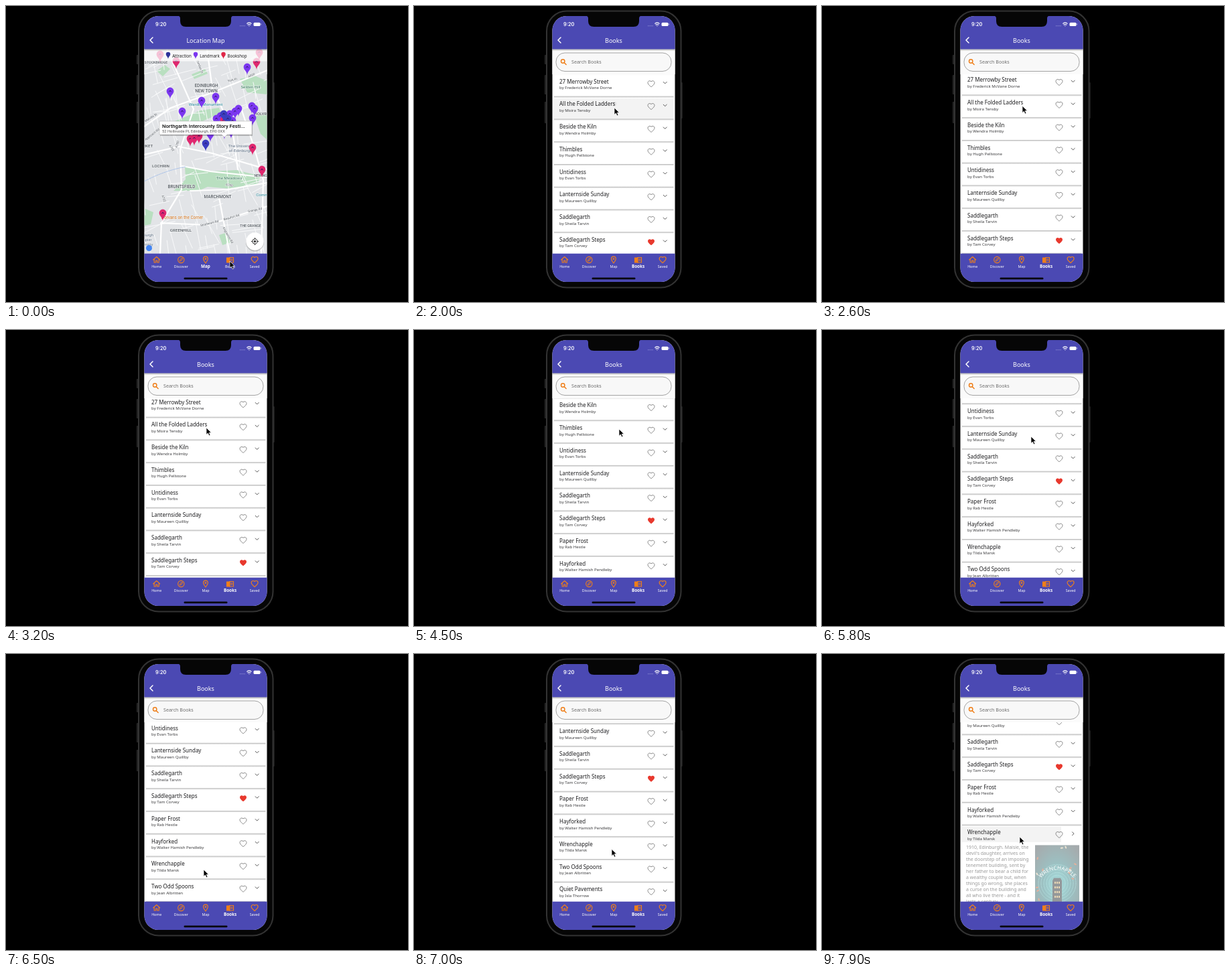
Animation of 600x442 px, one loop 8 s. Source, as an HTML page:

```html
<!DOCTYPE html>
<html lang="en">
<head>
<meta charset="utf-8">
<title>Book app</title>
<style>
  html, body { margin: 0; width: 100%; height: 100%; overflow: hidden; background: #000; }
  svg { display: block; width: 600px; height: 442px; }
  text { font-family: "Noto Sans", sans-serif; }
  .map text, .popup text { font-family: Roboto, sans-serif; }
  .map text { fill: #555b62; text-anchor: middle; paint-order: stroke; stroke: #f2f3f4; stroke-width: 1px; }
  .mid { text-anchor: middle; }
  .title { font-size: 8px; font-weight: 500; fill: #1d1d1f; }
  .by { font-size: 6.1px; fill: #3a3a3c; }
  .line { fill: none; stroke-linecap: round; stroke-linejoin: round; }
</style>
</head>
<body>
<svg id="stage" viewBox="0 0 600 442" xmlns="http://www.w3.org/2000/svg">
  <defs>
    <clipPath id="screen"><rect x="206.5" y="15" width="183" height="397" rx="21"/></clipPath>
    <clipPath id="listArea"><rect x="206.5" y="101" width="183" height="269"/></clipPath>
    <clipPath id="mapArea"><rect x="206.5" y="64" width="183" height="306"/></clipPath>
    <linearGradient id="shade" x2="0" y2="1">
      <stop offset="0" stop-color="#000" stop-opacity=".28"/>
      <stop offset="1" stop-color="#000" stop-opacity="0"/>
    </linearGradient>
    <radialGradient id="cover" cx=".5" cy=".6" r=".7">
      <stop offset="0" stop-color="#55c5c5"/>
      <stop offset=".45" stop-color="#3b8588"/>
      <stop offset="1" stop-color="#4e5a5e"/>
    </radialGradient>
    <path id="heart" transform="scale(.5) translate(-12 -12)" d="M12 21.3l-1.5-1.3C5.4 15.4 2 12.3 2 8.5 2 5.4 4.4 3 7.5 3c1.7 0 3.4.8 4.5 2.1C13.1 3.8 14.8 3 16.5 3 19.6 3 22 5.4 22 8.5c0 3.8-3.4 6.9-8.6 11.5z"/>
    <path id="pin" d="M0 12C-.6 6-5.4 4.6-5.4 0a5.4 5.4 0 0 1 10.8 0C5.4 4.6.6 6 0 12z"/>
  </defs>

  <g fill="#242424">
    <rect x="194.8" y="73" width="4" height="14" rx="1"/>
    <rect x="194.8" y="103" width="4" height="29" rx="1"/>
    <rect x="194.8" y="143" width="4" height="32" rx="1"/>
    <rect x="397.5" y="114" width="3.2" height="54" rx="1"/>
  </g>
  <rect x="198" y="7.5" width="200.5" height="413" rx="30" fill="#060606" stroke="#333" stroke-width="2"/>

  <g clip-path="url(#screen)">
    <rect x="206" y="15" width="184" height="397" fill="#fbfbfb"/>
    <g id="list" clip-path="url(#listArea)"><g id="rows"></g></g>
    <rect x="206" y="64" width="184" height="38" fill="#fbfbfb"/>
    <rect x="212" y="70" width="172" height="27.5" rx="13" fill="#f8f8f8" stroke="#8f8f8f" stroke-width=".8"/>
    <g class="line" stroke="#ef7f1a" stroke-width="1.5">
      <circle cx="222.2" cy="82.5" r="2.7"/><path d="M224.3 84.7l2.8 2.8"/>
    </g>
    <text x="235" y="86" font-size="7.1" fill="#6d6d6d">Search Books</text>
    <g id="map" class="map" clip-path="url(#mapArea)"></g>
    <rect x="206" y="15" width="184" height="49.5" fill="#4b49b3"/>
    <rect x="206" y="64.5" width="184" height="3" fill="url(#shade)"/>
    <path class="line" d="M219 47l-4 4 4 4" stroke="#fff" stroke-width="1.5"/>
    <text id="mapTitle" class="mid" x="298" y="54.5" font-size="9" font-weight="500" fill="#fff">Location Map</text>
    <text id="bookTitle" class="mid" x="298" y="54.5" font-size="9" font-weight="500" fill="#fff">Books</text>
    <text x="223" y="30" style="font-family:Inter,sans-serif" font-size="7.3" font-weight="600" fill="#fff">9:20</text>
    <path d="M349 29.7h8" stroke="#8583d0" stroke-width="1.2" stroke-dasharray="1.2 1"/>
    <g class="line" stroke="#fff" stroke-width="1.2">
      <path d="M359.7 26.2q3.2-2.6 6.4 0M361.1 28q1.8-1.5 3.6 0"/><path d="M362.9 29.6v.1"/>
    </g>
    <rect x="369.5" y="24.7" width="10" height="5.3" rx="1.5" fill="#fff"/>
    <path d="M380.7 26.3v2" stroke="#b9b8e4" stroke-width=".9"/>
    <rect x="206" y="369.7" width="184" height="43" fill="#4b49b3"/>
    <g id="nav"></g>
    <rect x="265.5" y="405.6" width="65" height="2.6" rx="1.3" fill="#08080c"/>
  </g>
  <path d="M256 14.5h84q-4 .3-4 4v4q0 8.500-8.500 8.500h-59q-8.500 0-8.500-8.500v-4q0-3.700-4-4z" fill="#060606"/>
  <path id="cursor" d="M0 0v10.200l2.400-2.200 1.700 3.800 1.800-.8-1.700-3.700h3.200z" fill="#000" stroke="#fff" stroke-width=".7"/>
</svg>

<script>
const $ = id => document.getElementById(id);
const LOOP = 8000, STEP = 100, PITCH = 33.77, OPEN_ROW = 10, LIKED_ROW = 7;

const books = [
  ["27 Merrowby Street", "Frederick McVane Dorne"],
  ["All the Folded Ladders", "Moira Tensby"],
  ["Beside the Kiln", "Wendra Holmby"],
  ["Thimbles", "Hugh Pellstone"],
  ["Untidiness", "Evan Torbs"],
  ["Lanternside Sunday", "Maureen Quillby"],
  ["Saddlegarth", "Sheila Tarvin"],
  ["Saddlegarth Steps", "Tam Corvey"],
  ["Paper Frost", "Rab Hestle"],
  ["Hayforked", "Walter Hamish Pendleby"],
  ["Wrenchapple", "Tilda Marsk"],
  ["Two Odd Spoons", "Jean Albritten"],
  ["Quiet Pavements", "Isla Thorrow"],
  ["Slate and Tallow", "Murdo Fennick"]
];

const blurb = ["1910, Edinburgh. Maisie, the", "devil's daughter, arrives on",
  "the doorstep of an imposing", "tenement building, sent by", "her father to bear a child for",
  "a wealthy couple but, when", "things go wrong, she places", "a curse on the building and",
  "all who live there - and it", "lasts a century."];

const label = (x, y, s, size = 6, extra = "") =>
  `<text x="${x}" y="${y}" font-size="${size}" ${extra}>${s}</text>`;
const use = (id, x, y, extra = "") => `<use href="#${id}" transform="translate(${x} ${y})" ${extra}/>`;

function seeded(seed) {
  return () => (seed = (seed * 16807) % 2147483647) / 2147483647;
}

function buildRows() {
  $("rows").innerHTML = books.map(([title, author], i) => {
    const y = 112.7 + i * PITCH, liked = i === LIKED_ROW;
    return `<g class="row">
      <rect x="209" y="${y - 9.5}" width="178.500" height="31.500" fill="#fff"/>
      <rect x="209" y="${y + 22}" width="178.500" height="2.600" fill="url(#shade)"/>
      <g class="press"></g>
      ${label(217, y + 2.9, title, 8, 'class="title"')}
      ${label(217, y + 11.4, "by " + author, 6.1, 'class="by"')}
      ${use("heart", 354, y + 3.6, liked ? 'fill="#e8382d"' : 'fill="none" stroke="#777" stroke-width="1.7"')}
      <path class="line chevron" d="M-2.500-1.200L0 1.300 2.500-1.200" stroke="#555" stroke-width="1"
        transform="translate(374.700 ${y + 1.9})"/></g>`;
  }).join("");
}

function buildPanel() {
  const y = 112.7 + OPEN_ROW * PITCH + 18, rnd = seeded(11);
  let leaves = "";
  for (let i = 0; i < 26; i++) {
    const x = 321 + rnd() * 60, dy = rnd() * 92;
    if (Math.abs(x - 351) > 18 || dy < 14)
      leaves += `<ellipse cx="${x}" cy="${y + dy + 3}" rx="2.200" ry="1.100" fill="${i % 3 ? "#c9653f" : "#d9c9a8"}"
        transform="rotate(${rnd() * 180} ${x} ${y + dy + 3})"/>`;
  }
  let rings = "";
  for (let r = 12; r < 32; r += 4)
    rings += `<circle cx="351" cy="${y + 58}" r="${r}" class="line" stroke="#7fd6d3" stroke-width=".7" stroke-dasharray="1 1.500"/>`;
  const g = document.createElementNS("http://www.w3.org/2000/svg", "g");
  g.id = "panel";
  g.innerHTML = `<rect x="209" y="${y - 2}" width="178.500" height="110" fill="#fff"/>
    <g id="details">${blurb.map((s, i) => label(215, y + 7 + i * 9, s, 7, 'fill="#333"')).join("")}
    <g opacity="1.000"><rect x="318" y="${y + 1}" width="66" height="100" fill="url(#cover)"/>
    ${rings}${leaves}
    <path id="arc" class="line" d="M324 ${y + 53}Q351 ${y + 22} 379 ${y + 53}"/>
    <text font-size="8" fill="#fff" class="mid"><textPath href="#arc" startOffset="50%">WRENCHAPPLE</textPath></text>
    <path d="M344 ${y + 92}v-38l2-4h10l2 4v38z" fill="#2c3438"/>
    <path d="M347 ${y + 57}h8M347 ${y + 64}h8M347 ${y + 71}h8M347 ${y + 78}h8" stroke="#d2b06c" stroke-width="3" stroke-dasharray="2 1"/></g></g>`;
  $("rows").append(g);
}

function buildMap() {
  const rnd = seeded(7);
  let streets = "";
  for (let i = 0; i < 150; i++) {
    const a = (rnd() < .5 ? -.3 : 1.25) + (rnd() - .5) * .5, len = 15 + rnd() * 35;
    const x = 200 + rnd() * 190, y = 66 + rnd() * 300;
    streets += `M${x} ${y}l${Math.cos(a) * len} ${Math.sin(a) * len}`;
  }
  const places = [
    [224, 86, "STOCKBRIDGE", 5.2], [299, 121, "EDINBURGH", 6.4], [299, 129, "NEW TOWN", 6.4],
    [386, 163, "HOLYROOD", 6.2], [207, 211, "MARKET", 6.2], [231, 241, "LOCHRIN", 6.2],
    [262, 271.500, "BRUNTSFIELD", 6.4], [316, 287, "MARCHMONT", 6.4], [261, 337, "GREENHILL", 6.2],
    [365, 330, "THE GRANGE", 5.2], [385, 255, "NEWINGTON", 5]
  ];
  const sights = [
    [298, 149, "Wardle Monument", 6.2, "#23889b"], [365, 123, "Selden Hill", 6.2, "#317a55"],
    [333, 259, "The Meadows", 6.2, "#317a55"], [351, 211, "The University", 6.2, "#5f7085"],
    [350, 218, "of Edinburgh", 6.2, "#5f7085"], [263, 318, "Dorvans on the Corner", 6.3, "#d4761f"],
    [386, 284, "Common", 6.2, "#23889b"], [211, 344, "nburgh", 5.8, "#5f7085"],
    [211, 351, "apier", 5.8, "#5f7085"], [211, 358, "versity", 5.8, "#5f7085"]
  ];
  const roads = [
    [288, 91, "Dundas St", 70], [367, 105, "A900", -25], [338, 112, "York Pl", -12], [217, 168, "Melville St", -32],
    [219, 193, "Approach Rd", -38], [257, 207, "A700", -75], [246, 213, "A702", 55],
    [333, 269, "A700", 10], [304, 326, "Strathearn Rd", -14], [337, 317, "Beaufort Rd", -16],
    [372, 306, "Grange Rd", -12], [330, 343, "Kilgraston Rd", 60], [234, 288, "A702", 70]
  ];
  const pins = {
    "#7b37f0": [[360, 91], [245, 127], [292, 141], [313, 135], [263, 157], [314, 168], [320, 164], [334, 161],
      [342, 157], [347, 153], [367, 149], [371, 153], [368, 167], [338, 171], [305, 191], [336, 186], [326, 187]],
    "#e0286f": [[254, 82], [374, 83], [275, 198], [281, 197], [288, 194], [368, 211], [382, 244], [234, 309], [325, 170]],
    "#3b3ec0": [[325, 161], [331, 168], [298, 205]]
  };
  const marker = (x, y, fill) => use("pin", x, y, `fill="${fill}"`) +
    `<path class="line" d="M${x - 1.5} ${y + 1}l1.500-2 1.500 2" stroke="#2a1760" stroke-width=".9"/>`;
  const small = (x, fill) => `<use href="#pin" transform="translate(${x} 72) scale(.6)" fill="${fill}"/>`;

  $("map").innerHTML = `<rect x="206" y="64" width="184" height="306" fill="#e2e4e7"/>
    <g fill="#b9dfc0">
      <path d="M267 239l35 8 42-2 36 9-4 11-40 8-35-3-14 6h-37l18-17z"/>
      <path d="M349 109l22-5 19 8v20l-30-3z"/><path d="M252 172l38-16 28-4 3 8-44 19z"/>
      <path d="M371 165l19-5v40l-10-9z"/><path d="M225 97l12-9 8 6-11 11z"/>
      <path d="M206 302l14 6-4 18-10 2zM318 342l12-4 6 15-13 4z"/><path d="M277 102l20-8 4 7-20 8z"/>
    </g>
    <path class="line" d="${streets}" stroke="#f8f9fa" stroke-width="1"/>
    <path class="line" stroke="#fff" stroke-width="2.200" d="M206 180l40-28 60-22 84-34M240 64l40 90-20 60 2 60-30 50-2 46M206 222l52-12 50 10 82 24M263 239l42 8 85 9M350 150l20 60 14 50-3 110M231 324l70 3 89-28M300 64l8 60 30 60 8 60M275 276l55-2 60-10M318 286l16 84"/>
    <path class="line" d="M206 262q30-16 62-22" stroke="#9ab8e8" stroke-width=".8" stroke-dasharray="2 1"/>
    ${places.map(([x, y, s, z]) => label(x, y, s, z, 'font-weight="500"')).join("")}
    ${sights.map(([x, y, s, z, c]) => label(x, y, s, z, `style="fill:${c}"`)).join("")}
    ${roads.map(([x, y, s, r]) => label(x, y, s, 4.6, `transform="rotate(${r} ${x} ${y})"`)).join("")}
    ${Object.entries(pins).map(([c, list]) => list.map(([x, y]) => marker(x, y, c)).join("")).join("")}
    ${marker(230, 72, "#e0286f")}${marker(378, 69, "#e0286f")}
    <rect x="206" y="64" width="184" height="18.500" fill="#fff" opacity=".72"/>
    ${small(242, "#2d3199")}${small(283, "#7b37f0")}${small(324.500, "#e02848")}
    <g style="font-family:'Noto Sans',sans-serif">
      ${[[262.500, "Attraction"], [304, "Landmark"], [345, "Bookshop"]].map(([x, s]) =>
        label(x, 76.500, s, 6.2, `style="font-family:'Noto Sans',sans-serif;fill:#222;stroke:none"`)).join("")}
    </g>
    <rect x="230" y="173" width="138" height="21" fill="#000" opacity=".22"/>
    <path d="M229 172h138v20h-37l-4 4-4-4h-93z" fill="#fff" stroke="#aaa" stroke-width=".5"/>
    <g class="popup">
      ${label(233, 181.500, "Northgarth Intercounty Story Festi...", 7.7, 'style="fill:#111;text-anchor:start;stroke:none" font-weight="500"')}
      ${label(233, 189, "52 Hollinside Pl, Edinburgh, EH0 0XX", 5.8, 'style="fill:#555;text-anchor:start;stroke:none"')}
    </g>
    <circle cx="213.500" cy="361.500" r="4.500" fill="#4285f4"/>
    <circle cx="371.500" cy="353" r="13.500" fill="#000" opacity=".18"/>
    <circle cx="371.500" cy="351.500" r="13.200" fill="#fff"/>
    <g class="line" stroke="#333" stroke-width="1"><circle cx="371.500" cy="351.500" r="3.700"/>
      <path d="M371.500 346.300v1.500M371.500 355.200v1.500M366.300 351.500h1.500M375.200 351.500h1.500"/></g>
    <circle cx="371.500" cy="351.500" r="1.700" fill="#333"/>`;
}

function buildNav() {
  const icons = [
    '<path d="M-5 0L0-4.500 5 0M-3.500-1v5h2.500V1h2v3h2.500v-5"/>',
    '<circle r="4.600"/><path d="M2.200-2.200L.9.900-2.200 2.200-.9-.9z" stroke-width=".9"/>',
    '<path d="M0 5C-1.500 2.500-3.400.8-3.400-1.500a3.400 3.400 0 0 1 6.800 0C3.400.8 1.500 2.500 0 5z"/><circle cy="-1.500" r=".8"/>',
    '<path d="M-5-3h4.500v7H-5z" fill="#ef7f1a"/><path d="M-1-3.500h6v7.500h-6M1-1h2.500M1 1h2.500"/>',
    '<use href="#heart" stroke-width="2.300"/>'
  ];
  $("nav").innerHTML = ["Home", "Discover", "Map", "Books", "Saved"].map((s, i) => {
    const x = 224.7 + i * 36.6;
    return `<g class="line" stroke="#ef7f1a" stroke-width="1.150" transform="translate(${x} 379)">${icons[i]}</g>` +
      label(x, 391.3, s, 5.3, 'class="mid tab" fill="#fff"');
  }).join("");
}

// Rows of [time, values...]; a trailing "coast" slows into that row.
const cursorPath = [[0, 334, 381], [800, 334, 381], [1100, 330, 368], [1200, 330, 368], [1900, 299, 152],
  [2100, 299, 152], [3200, 299, 146], [3500, 299, 146], [4000, 300, 110], [4200, 300, 110], [4800, 312, 186],
  [5100, 312, 170], [5300, 312, 159], [5800, 312, 159], [6300, 295, 322], [6500, 295, 322], [7300, 295, 273]];
const scrollPath = [[0, 0], [2100, 0], [3200, 5], [3500, 5], [4000, 45], [4800, 70, "coast"],
  [5100, 86], [5300, 97], [6500, 137, "coast"], [7300, 184]];

function sample(path, t) {
  const i = path.findIndex(row => row[0] > t);
  if (i < 0) return path[path.length - 1].slice(1);
  const a = path[i - 1], b = path[i];
  let k = (t - a[0]) / (b[0] - a[0]);
  if (b.includes("coast")) k = 1 - Math.pow(1 - k, 2.5);
  return a.slice(1).map((v, n) => v + (b[n + 1] - v) * k);
}

const clamp = v => Math.max(0, Math.min(1, v));

buildRows();
buildPanel();
buildMap();
buildNav();
const rows = [...document.querySelectorAll(".row")];
const tabs = [...document.querySelectorAll(".tab")];
const openChevron = rows[OPEN_ROW].querySelector(".chevron");

function press(row, on, width, ripple) {
  const y = 112.7 + row * PITCH;
  rows[row].querySelector(".press").innerHTML = on
    ? `<rect x="207" y="${y - 8.500}" width="${width}" height="${ripple ? 30 : 23}" fill="#f3f3f3"/>` +
      (ripple ? `<circle cx="299" cy="${y + 33.3 - PITCH}" r="${ripple}" fill="#e7e7e7"/>` : "")
    : "";
}

function draw(t) {
  const [x, y] = sample(cursorPath, t);
  const [scroll] = sample(scrollPath, t);
  $("cursor").setAttribute("transform", `translate(${x} ${y})`);
  $("rows").setAttribute("transform", `translate(0 ${-scroll})`);

  const page = clamp((t - 100) / 300);
  $("map").setAttribute("opacity", 1 - page);
  $("mapTitle").setAttribute("opacity", 1 - page);
  $("bookTitle").setAttribute("opacity", page);
  const active = t < 200 ? 2 : 3;
  tabs.forEach((tab, i) => {
    tab.setAttribute("font-size", i === active ? 6.3 : 5.3);
    tab.setAttribute("font-weight", i === active ? 700 : 400);
  });

  press(1, t >= 2000 && t < 2300, 180.5, 3.5 + (t - 2000) / 60);
  press(OPEN_ROW, t >= 7700, 50 + (t - 7700) / 2, 0);

  const open = clamp((t - 7800) / 200);
  $("panel").setAttribute("display", open ? "inline" : "none");
  $("details").setAttribute("opacity", open);
  openChevron.setAttribute("transform",
    `translate(374.700 ${114.6 + OPEN_ROW * PITCH}) rotate(${-180 * open})`);
  rows.slice(OPEN_ROW + 1).forEach(r => r.setAttribute("transform", `translate(0 ${open * 230})`));
}

const start = performance.now();
function tick() {
  const t = (performance.now() - start) % LOOP;
  draw(Math.floor(t / STEP) * STEP);
  requestAnimationFrame(tick);
}
tick();
</script>
</body>
</html>
```
